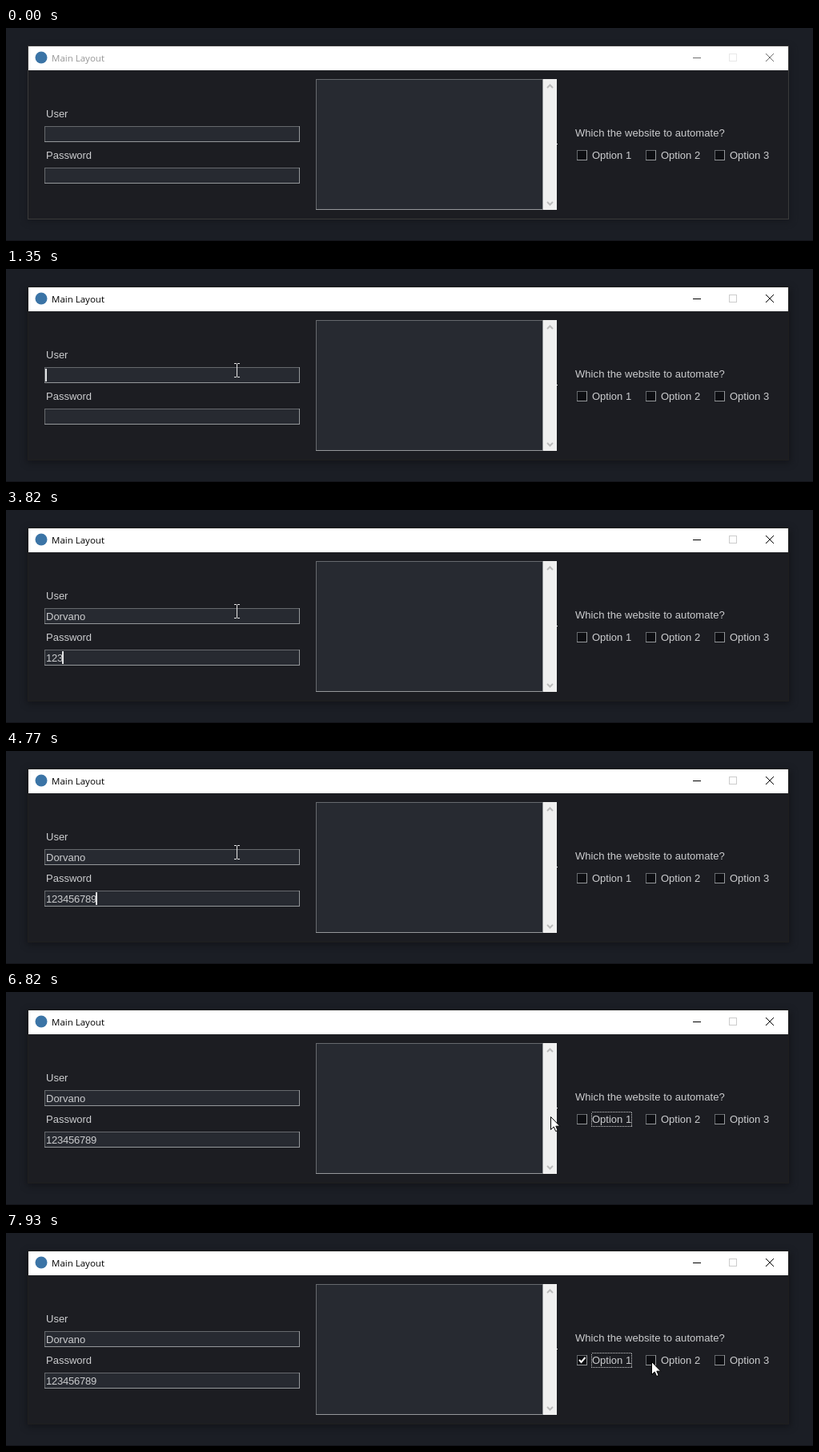
An HTML page for the animation above (8 s loop, 1008 px wide and 267 px high).

```html
<!DOCTYPE html>
<html lang="en">
<head>
<meta charset="utf-8">
<title>Main Layout</title>
<style>
  html, body { margin: 0; width: 100%; height: 100%; overflow: hidden; background: #1b1e25; }
  svg { display: block; width: 100vw; height: 100vh; }
  text { font: 13px "Liberation Sans", Arial, sans-serif; fill: #cccdcf; white-space: pre; }
  #title { font: 11.5px "Open Sans", "Noto Sans", sans-serif; }
  #pass { letter-spacing: -.23px; }
  #question { letter-spacing: .06px; }
  #shadow { filter: blur(5px); }
  .crisp { shape-rendering: crispEdges; }
  .line { fill: none; }
</style>
</head>
<body>
<svg viewBox="0 0 1008 267" preserveAspectRatio="none">
  <rect width="1008" height="267" fill="#1b1e25"/>
  <rect y="266" width="1008" height="1" fill="#13141a"/>
  <rect id="shadow" x="26" y="24" width="954" height="219" fill="#0c0d11"/>
  <g class="crisp">
    <rect id="frame" x="27" y="22" width="951" height="218"/>
    <rect x="28" y="23" width="949" height="216" fill="#1c1d22"/>
    <rect x="28" y="23" width="949" height="30" fill="#fff"/>
  </g>
  <circle cx="44" cy="37" r="7.5" fill="#3b74a6"/>
  <text id="title" x="57" y="42">Main Layout</text>
  <path id="min" class="line crisp" d="M858 37.5h10"/>
  <rect id="max" class="line crisp" x="903.5" y="32.5" width="9" height="9"/>
  <path id="close" class="line" d="M949 32l10 10m0-10l-10 10"/>

  <g id="fields" class="crisp"></g>
  <rect class="crisp" x="671" y="64" width="17" height="164" fill="#f0f0f0"/>
  <path class="line" d="M676 75l3.5-3.5 3.5 3.5M676 218l3.5 3.5 3.5-3.5" stroke="#bdbdbd" stroke-width="2"/>
  <rect class="crisp" x="687" y="145" width="2" height="1" fill="#f4f4f4"/>

  <text x="50" y="112">User</text>
  <text x="50" y="164">Password</text>
  <text id="user" x="50" y="138"></text>
  <text id="pass" x="50" y="190"></text>
  <rect id="caret" class="crisp" width="2" height="16" fill="#e2e3e5"/>

  <text id="question" x="711" y="136">Which the website to automate?</text>
  <text x="732" y="164">Option 1</text>
  <text x="818" y="164">Option 2</text>
  <text x="904" y="164">Option 3</text>
  <path id="tick" class="line" d="M716 159l2.5 3 5-6" stroke="#fff" stroke-width="2"/>
  <rect id="focus" class="line crisp" x="731.5" y="150.5" width="50" height="18" stroke="#cccdcf" stroke-dasharray="1 1"/>

  <path id="arrow" d="M.5 .5V16.5L4.2 13 6.7 18.6 9.2 17.5 6.8 12.2H11.8Z" fill="#fff" stroke="#000"/>
  <path id="beam" class="line crisp" d="M-3 -8.5h3m1 0h3M-3 8.5h3m1 0h3M.5 -8v16" stroke="#e6e6e6"/>
</svg>
<script>
const LOOP = 8000;
const $ = id => document.getElementById(id);
const set = (id, attrs) => { for (const k in attrs) $(id).setAttribute(k, attrs[k]); };
const show = (id, on) => set(id, { visibility: on ? "visible" : "hidden" });

// Sunken boxes: x, y, width, height
const inputs = [[48, 123, 319, 20], [48, 175, 319, 20], [387, 64, 284, 164]];
const boxes = [713, 799, 885].map(x => [x, 153, 13, 13]);
const sunken = fill => ([x, y, w, h]) =>
  `<rect x="${x}" y="${y}" width="${w}" height="${h}" fill="#95989b"/>` +
  `<rect x="${x}" y="${y}" width="${w - 1}" height="${h - 1}" fill="#66696d"/>` +
  `<rect x="${x + 1}" y="${y + 1}" width="${w - 2}" height="${h - 2}" fill="${fill}"/>`;
$("fields").innerHTML = inputs.map(sunken("#272a31")).join("") + boxes.map(sunken("#0d0e12")).join("");

const userName = "Dorvano", userKeys = [1660, 1790, 1980, 2170, 2290, 2410, 2540];
const password = "123456789", passKeys = [3530, 3680, 3820, 4100, 4165, 4230, 4410, 4590, 4770];
const typed = (text, keys, t) => text.slice(0, keys.filter(k => k <= t).length);

// Pointer path: time, x, y
const path = [
  [140, 435, 0], [220, 378, 52], [310, 318, 104], [440, 288, 127],
  [5960, 288, 127], [6100, 312, 121], [6240, 361, 115], [6400, 452, 119],
  [6560, 582, 138], [6720, 673, 154], [6790, 673, 154], [6940, 740, 168],
  [7050, 740, 168], [7230, 710, 161], [7390, 722, 156], [7590, 722, 156],
  [7710, 765, 146], [7850, 805, 162], [7890, 805, 162], [7930, 806, 161]
];

// Cubic Hermite with limited slopes, so rests stay still
function slope(i, c) {
  const a = path[i - 1], b = path[i], d = path[i + 1];
  if (!a || !d) return 0;
  const l = (b[c] - a[c]) / (b[0] - a[0]), r = (d[c] - b[c]) / (d[0] - b[0]);
  return l * r > 0 ? 2 * l * r / (l + r) : 0;
}
function pointer(t) {
  const last = path.length - 1;
  if (t >= path[last][0]) return path[last].slice(1);
  const i = Math.max(0, path.findIndex(p => p[0] > t) - 1);
  const a = path[i], b = path[i + 1], d = b[0] - a[0], u = (t - a[0]) / d;
  return [1, 2].map(c => {
    const s = u * u * (3 - 2 * u);
    return a[c] + (b[c] - a[c]) * s +
      d * u * (1 - u) * ((1 - u) * slope(i, c) - u * slope(i + 1, c));
  });
}
const inside = (x, y) => inputs.some(([l, t, w, h]) => x >= l && x < l + w && y >= t && y < t + h);

const gray = (from, to, k) => {
  const v = Math.round(from + (to - from) * k);
  return `rgb(${v},${v},${v})`;
};

function draw(t) {
  const active = t < 750 ? 0 : t < 830 ? 0.5 : 1;
  set("shadow", { opacity: 0.35 + 0.25 * active });
  set("frame", { fill: gray(58, 31, active) });
  $("title").style.fill = gray(150, 0, active);
  set("min", { stroke: gray(110, 0, active) });
  set("close", { stroke: gray(110, 0, active) });
  set("max", { stroke: gray(232, 204, active) });

  $("user").textContent = typed(userName, userKeys, t);
  $("pass").textContent = typed(password, passKeys, t);
  const field = t < 2950 ? "user" : "pass";
  const length = $(field).textContent ? $(field).getComputedTextLength() : 0;
  set("caret", { x: 49 + Math.round(length), y: field === "user" ? 125 : 177 });
  show("caret", t >= 1350 && t < 5300);

  show("focus", t >= 5460);
  show("tick", t >= 7480);

  const [x, y] = pointer(t).map(Math.round);
  const overText = inside(x, y);
  set("arrow", { transform: `translate(${x} ${y})` });
  set("beam", { transform: `translate(${x} ${y})` });
  show("arrow", t >= 140 && !overText);
  show("beam", t >= 140 && overText);
}

const start = performance.now();
function tick() {
  draw((performance.now() - start) % LOOP);
  requestAnimationFrame(tick);
}
tick();
</script>
</body>
</html>
```
